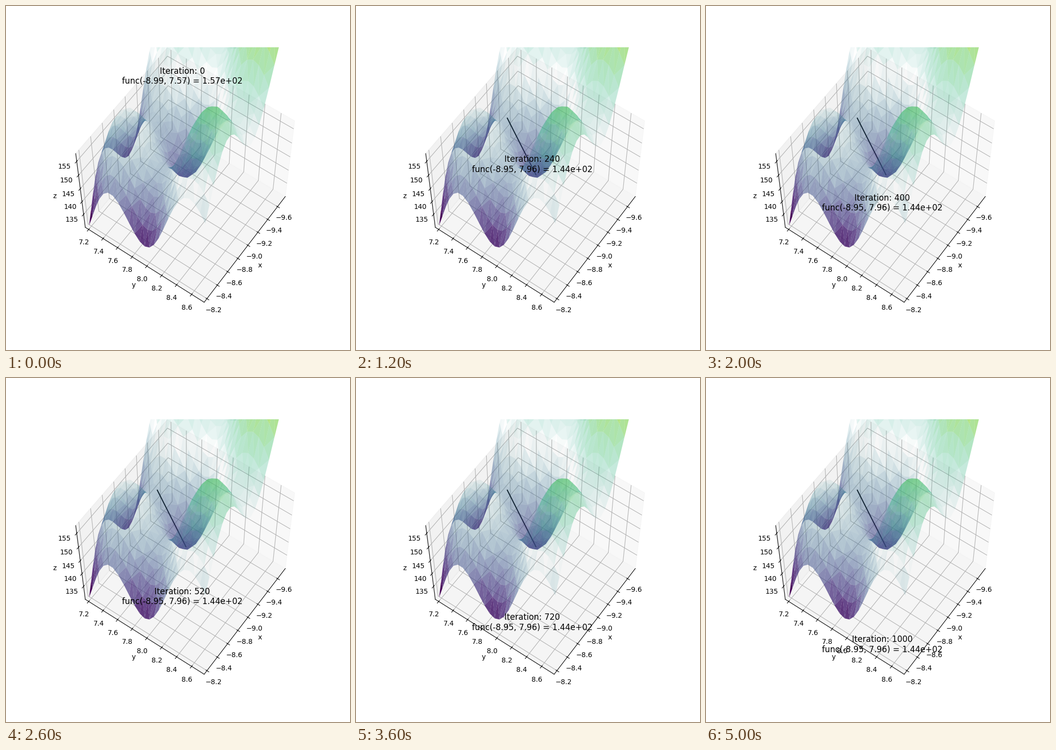
Recreate the animation shown at these times as a matplotlib script. Size 700 px wide and 700 px high, loop 5200 ms.

```python
import numpy as np
import matplotlib.pyplot as plt
from matplotlib.animation import FuncAnimation
from matplotlib.colors import ListedColormap

FRAMES = 26
INTERVAL = 200
STRIDE = 40          # descent iterations per frame
RATE = 0.001
START = (-8.99, 7.572)
GRID = 25


def rastrigin(x, y):
    return (20 + x**2 - 10 * np.cos(2 * np.pi * x)
            + y**2 - 10 * np.cos(2 * np.pi * y))


def descend(start, steps):
    p = np.array(start)
    points = [p]
    for _ in range(steps):
        p = p - RATE * (2 * p + 20 * np.pi * np.sin(2 * np.pi * p))
        points.append(p)
    return np.array(points)


def padded(lo, hi):
    pad = (hi - lo) / 48
    return lo - pad, hi + pad


xy = descend(START, STRIDE * (FRAMES - 1))[::STRIDE]
trail = np.column_stack([xy, rastrigin(*xy.T)])

# Square patch of the function around the minimum
center = xy[-1]
reach = 2 * np.abs(center - xy[0]).max()
x_range, y_range = [(c - reach, c + reach) for c in center]
X, Y = np.meshgrid(np.linspace(*x_range, GRID), np.linspace(*y_range, GRID))
Z = rastrigin(X, Y)

# Viridis, fading out towards the middle of the range
colors = plt.get_cmap("viridis")(np.linspace(0, 1, 256))
colors[:, 3] = np.abs(np.linspace(-1, 1, 256))
faded = ListedColormap(colors)

fig = plt.figure(figsize=(7, 7), dpi=100)
ax = fig.add_subplot(projection="3d")
ax.apply_aspect = lambda position=None: None   # fill the whole subplot area
ax.set_box_aspect((1, 1, 1), zoom=3**0.5 / 1.8294640721620434)
ax.view_init(elev=60, azim=35)

ax.plot_trisurf(X.ravel(), Y.ravel(), Z.ravel(), cmap=faded)
line, = ax.plot(*trail[:1].T, color="black", zorder=2)

ax.set_xlabel("x")
ax.set_ylabel("y")
ax.set_zlabel("z")
ax.set_xticks(np.arange(-96, -81, 2) / 10)
ax.set_yticks(np.arange(72, 87, 2) / 10)
ax.set_zticks(np.arange(135, 156, 5))
ax.set_xlim(*padded(*x_range))
ax.set_ylim(*padded(*y_range))
ax.set_zlim(*padded(Z.min(), trail[0, 2]))


def draw(k):
    x, y, z = trail[k]
    line.set_data_3d(*trail[:k + 1].T)
    ax.set_title(f"Iteration: {k * STRIDE}\nfunc({x:.2f}, {y:.2f}) = {z:.2e}",
                 y=0.92 ** (k + 1), zorder=10)
    return line, ax.title


anim = FuncAnimation(fig, draw, frames=FRAMES, interval=INTERVAL,
                     init_func=lambda: draw(0), repeat=True)
plt.show()
```
